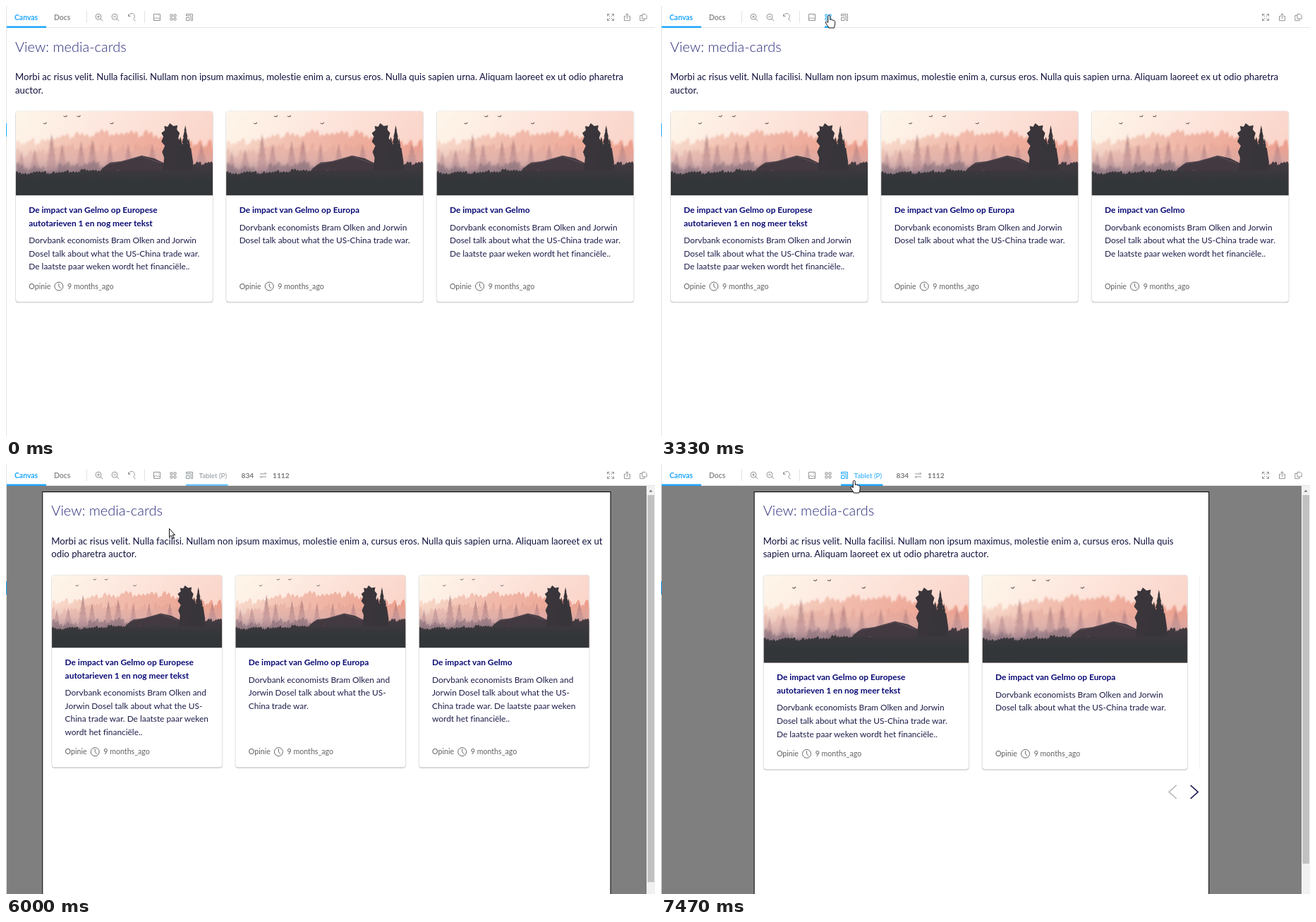
Write an HTML page that moves like this. It is 920 px wide and 609 px high and loops after 8000 ms.

```html
<!DOCTYPE html>
<html lang="nl">
<head>
<meta charset="utf-8">
<title>media-cards</title>
<style>
  html, body { margin: 0; width: 100%; height: 100%; overflow: hidden; background: #fff; }
  svg { display: block; }
  text { font-family: Lato, "Open Sans", sans-serif; font-variant-ligatures: none; white-space: pre; }
  .heading { font-size: 20px; font-weight: 300; fill: #2b2b7c; }
  .intro { font-size: 13.2px; fill: #12123f; }
  .title { font-size: 11.95px; font-weight: 700; fill: #0a0a75; }
  .copy { font-size: 11.9px; fill: #1d1d4b; }
  .meta { font-size: 10.65px; fill: #626262; }
  .tab { font-size: 10.4px; font-weight: 700; }
  .size { font-size: 10.2px; font-weight: 700; fill: #7b7b7b; }
  .label { font-size: 9.8px; fill: currentColor; }
  .item { font-size: 9.6px; fill: #444; }
  .icon { fill: none; stroke: currentColor; color: #949494; }
  .accent { fill: #1ea7fd; }
</style>
</head>
<body>
<svg id="stage" width="920" height="609" viewBox="0 0 920 609">
  <defs>
    <linearGradient id="sky" x2="1" y2=".35">
      <stop offset="0" stop-color="#fef6ea"/><stop offset=".5" stop-color="#fde5dc"/><stop offset="1" stop-color="#fad4c9"/>
    </linearGradient>
    <linearGradient id="far">
      <stop offset="0" stop-color="#f7d5c5"/><stop offset=".35" stop-color="#eeb3a2"/><stop offset="1" stop-color="#e98f7b"/>
    </linearGradient>
    <linearGradient id="mist" x2="0" y2="1">
      <stop offset="0" stop-color="#e8c4bd" stop-opacity="0"/><stop offset=".5" stop-color="#d3b0b2" stop-opacity=".7"/><stop offset="1" stop-color="#85768a"/>
    </linearGradient>
    <linearGradient id="hill" x2="0" y2="1">
      <stop offset="0" stop-color="#443b41"/><stop offset=".6" stop-color="#323639"/>
    </linearGradient>
    <clipPath id="rounded"><path d="M0 120V4Q0 0 4 0H276Q280 0 280 4V120Z"/></clipPath>
    <filter id="haze"><feGaussianBlur stdDeviation=".8"/></filter>
    <filter id="soft" x="-10%" y="-10%" width="120%" height="130%">
      <feDropShadow dx="0" dy="1" stdDeviation="1.6" flood-opacity=".22"/>
    </filter>
    <symbol id="photo" viewBox="0 0 280 119.5"></symbol>
  </defs>

  <rect width="920" height="609" fill="#fff"/>
  <g id="grid" stroke="#000">
    <path id="minor" stroke-opacity=".13"/>
    <path id="major" stroke-opacity=".38"/>
  </g>
  <g id="backdrop">
    <rect x="1" y="31" width="907" height="578" fill="#7f7f7f"/>
    <rect id="sheet" y="39.5" height="640" fill="#fff" stroke="#000"/>
  </g>
  <g id="page"></g>
  <g id="scrollbar">
    <rect x="908" y="31" width="12" height="578" fill="#f1f1f1"/>
    <path d="M911.5 39.5L914 36.5L916.5 39.5Z" fill="#777"/>
    <rect id="thumb" x="909.5" y="44" width="9.5" fill="#c1c1c1"/>
  </g>

  <rect width="920" height="30" fill="#fff"/>
  <path d="M0 30.5H920M.5 0V609M114.5 7V24M196.5 7V24" stroke="#e4e4e4"/>
  <rect class="accent" y="166" width="1" height="19"/>
  <rect class="accent" x="1" y="28.5" width="56" height="2.5"/>
  <text class="tab accent" x="12" y="19.5">Canvas</text>
  <text class="tab" x="68" y="19.5" fill="#8b8b8b">Docs</text>
  <g id="icons"></g>
  <rect id="gridLine" class="accent" x="232" y="28.5" width="10" height="2.5"/>
  <g id="viewport">
    <rect id="tabletLine" class="accent" x="255" y="28.5" width="59.5" height="2.5"/>
    <text id="tabletLabel" class="label" x="273.5" y="20">Tablet (P)</text>
    <text class="size" x="333.5" y="19.5">834</text>
    <path class="icon" d="M360 14H369L366.5 12M369 18H360L362.5 20"/>
    <text class="size" x="378" y="19.5">1112</text>
  </g>
  <g id="menu">
    <rect x="190.5" y="38.5" width="139" height="74.5" rx="4" fill="#fff" fill-opacity=".95" filter="url(#soft)"/>
    <text class="item" x="202" y="55">Small mobile</text>
    <text class="item" x="202" y="79.7">Large mobile</text>
    <text class="item" x="202" y="104.3">Tablet</text>
  </g>
  <g id="cursor" fill="#fff" stroke="#111" stroke-linejoin="round">
    <path id="hand" d="M-1.7 10V1.2C-1.7-.6 1.3-.6 1.3 1.2V6C2.5 5.2 3.8 5.6 4 6.6C5 6 6.3 6.4 6.4 7.5C7.6 7.2 8.2 8 8.2 9V12C8.2 14 7 15.5 6.8 17.5H-.8C-1 15.5-3.5 13.5-5 10.5C-5.8 8.8-4 7.8-3 9Z"/>
    <path id="arrow" d="M.5.5V12.5L3.2 10.2L5.2 14.5L7 13.7L5.1 9.5H8.5Z"/>
  </g>
</svg>

<script>
const $ = id => document.getElementById(id);
const clamp = v => Math.min(1, Math.max(0, v));
const show = (id, on) => $(id).style.display = on ? '' : 'none';
const LOOP = 8000, TICK = 200 / 3;

// Solves the CSS "ease" curve for progress p.
function ease(p) {
  let lo = 0, hi = 1;
  for (let i = 0; i < 24; i++) {
    const s = (lo + hi) / 2;
    if (.75 * s * (1 - s) + s ** 3 < p) lo = s; else hi = s;
  }
  return .3 * (1 - lo) ** 2 * lo + 3 * (1 - lo) * lo * lo + lo ** 3;
}
const ramp = (t, start, duration = 200) => ease(clamp((t - start) / duration));
const pulse = (t, on, off) => ramp(t, on) - ramp(t, off);

/* Grid overlay */
function gridPath(step) {
  let d = '';
  for (let v = step; v < 920; v += step) {
    const at = Math.floor(v + .01) + .5;
    d += `M${at} 31V609M1 ${at + 30}H920`;
  }
  return d;
}
$('minor').setAttribute('d', gridPath(15.42));
$('major').setAttribute('d', gridPath(77.1));

/* Landscape used on every card */
function conifer(x, top, base, width) {
  const left = [], right = [];
  for (let i = 1; i <= 7; i++) {
    const k = i / 7, y = top + (base - top) * k;
    right.push(`${x + width * k} ${y}`, `${x + width * k * .6} ${y - 1}`);
    left.unshift(`${x - width * k * .6} ${y - 1}`, `${x - width * k} ${y}`);
  }
  return `M${x} ${top}L${right.join('L')}L${left.join('L')}Z`;
}
function ridge(seed, step, spread, top) {
  let d = 'M0 120';
  const random = () => (seed = seed * 16807 % 2147483647) / 2147483647;
  for (let x = 0; x <= 280; x += step) {
    const y = top(x) + random() * spread;
    d += `L${x} ${y + spread * .4}L${x + step * .3} ${y + spread * .1}L${x + step * .5} ${y}L${x + step * .75} ${y + spread * .2}`;
  }
  return d + 'L281 120Z';
}
function landscape() {
  const path = (d, fill, more = '') => `<path d="${d}" fill="${fill}" ${more}/>`;
  const grove = [[8, 56, 8], [27, 54, 11], [51, 32, 11], [66, 46, 11], [93, 42, 11], [109, 40, 12],
    [134, 48, 10], [160, 46, 11], [194, 46, 12], [264, 46, 14]];
  const bird = ([x, y]) => `M${x - 3} ${y}L${x} ${y + 1}L${x + 2} ${y - 1}`;
  return `<g clip-path="url(#rounded)"><rect width="280" height="120" fill="url(#sky)"/><g filter="url(#haze)">`
    + path(ridge(11, 7, 11, x => 41 - 17 * Math.sin(x / 89)), 'url(#far)', 'opacity=".8"')
    + path(ridge(29, 6, 13, x => 52 - 9 * Math.sin(x / 89)), '#d9948a', 'opacity=".35"')
    + path(grove.map(([x, y, w]) => conifer(x, y, 92, w)).join(''), '#98666e', 'opacity=".5"')
    + `<rect y="48" width="280" height="44" fill="url(#mist)" opacity=".7"/>`
    + path(ridge(47, 6, 10, x => 72 + 4 * Math.sin(x / 20)), '#7d6874', 'opacity=".5"') + '</g>'
    + path(ridge(71, 4, 5, x => x < 100 ? 85 - x / 25 : 81 - (x - 100) / 16), 'url(#hill)')
    + path('M122 82L134 73L151 71L179 63L197 67L211 74L220 84H122Z', '#433a41')
    + path('M132 75L152 71L179 64L207 74', 'none', 'stroke="#6b5962" stroke-width=".7"')
    + path('M209 84L211 66L208 58L212 49L207 43L210 36L207 31L212 27L211 21L216 22L219 17L224 21L230 20L229 26L233 31L231 38L235 45L237 52H249L252 72V84Z', '#39353a')
    + path(conifer(241, 20, 80, 12) + conifer(234, 36, 84, 12) + conifer(246, 38, 80, 7), '#38353a')
    + path([[42, 17], [71, 7], [90, 7], [137, 17]].map(bird).join(''), 'none', 'stroke="#6b5a5a" stroke-width="1.1"')
    + '</g>';
}
$('photo').innerHTML = landscape();

/* Toolbar icons, drawn around their centres */
const lens = 'M3 -.8A4 4 0 1 1 -5 -.8A4 4 0 1 1 3 -.8M2 2L5.2 5.2';
const icons = [
  ['zoomIn', 132, lens + 'M-3 -.8H1M-1 -2.8V1.2'],
  ['zoomOut', 155, lens + 'M-3 -.8H1'],
  ['reset', 178.5, 'M-5 -4.5V-1.5H-2M-4.5 -1.5A4.2 4.2 0 1 1 2 2.2L5.2 5.2'],
  ['photoIcon', 214, 'M-4.5 -4.5H4.5V4.5H-4.5ZM-4.5 3L-1.5 0L.5 2L2 .5L4.5 3M1.5 -2.5H2.7'],
  ['gridIcon', 237, 'M-4 -4H-1V-1H-4ZM1 -4H4V-1H1ZM-4 1H-1V4H-4ZM1 1H4V4H1Z'],
  ['deviceIcon', 260, 'M-4.5 -2V-4.5H4.5V4.5H2.5M-4.5 -2.3H2.3V4.5M-4.5 .2H0V4.5H-4.5Z'],
  ['expand', 857, 'M-4.5 -1.5V-4.5H-1.5M1.5 -4.5H4.5V-1.5M4.5 1.5V4.5H1.5M-1.5 4.5H-4.5V1.5M-4.5 -4.5L-1 -1M4.5 -4.5L1 -1M4.5 4.5L1 1M-4.5 4.5L-1 1'],
  ['share', 880.5, 'M-2 -1.5H-4V4.7H4V-1.5H2M0 2V-5M-2.3 -2.8L0 -5L2.3 -2.8'],
  ['copy', 903.5, 'M-1.5 -4.5H2.5L4.7 -2.3V2H-1.5ZM-1.5 -2.5H-4.7V4.7H1.5V2']
];
$('icons').innerHTML = icons.map(([id, x, d]) =>
  `<path id="${id}" class="icon" d="${d}" transform="translate(${x} 16)"/>`).join('');

/* Page content */
const text = (cls, x, y, value) => `<text class="${cls}" x="${x}" y="${y}">${value}</text>`;
const LINE = 18.6, GAP = 18.5;
const intro = 'Morbi ac risus velit. Nulla facilisi. Nullam non ipsum maximus, molestie enim a, cursus eros. Nulla quis sapien urna. Aliquam laoreet ex ut odio pharetra auctor.';
const lead = 'Dorvbank economists Bram Olken and';
const cards = [
  { title: ['De impact van Gelmo op Europese', 'autotarieven 1 en nog meer tekst'] },
  { title: ['De impact van Gelmo op Europa'], brief: true },
  { title: ['De impact van Gelmo'] }
];

function introLines(width) {
  const [, last] = [[885, 'pharetra'], [800, 'ut'], [730, 'Aliquam'], [682, 'urna.'], [646.5, 'sapien'], [0, 'quis']]
    .find(([min]) => width >= min);
  const cut = intro.indexOf(` ${last} `) + last.length + 1;
  return [intro.slice(0, cut), intro.slice(cut + 1)];
}
function copyLines(width, brief) {
  let copy;
  if (width > 310) copy = `${lead} Jorwin Dosel|talk about what the US-China trade war. De laatste|paar weken wordt het financiële..`;
  else if (width > 292.3) copy = `${lead} Jorwin|Dosel talk about what the US-China trade war. De|laatste paar weken wordt het financiële..`;
  else if (width > 262) copy = `${lead} Jorwin|Dosel talk about what the US-China trade war.|De laatste paar weken wordt het financiële..`;
  else copy = `${lead}|Jorwin Dosel talk about what the US-|China trade war. De laatste paar weken|wordt het financiële..`;
  if (brief) copy = copy.split('war.')[0] + 'war.';
  return copy.split('|');
}

function pageMarkup(left, width, shift) {
  const columns = width > 766 ? 3 : 2;
  const w = (width - 43 - GAP * (columns - 1)) / columns;
  const top = 149 + shift, photoHeight = (w - .5) * .4268;
  const firstLine = top + photoHeight + 24.8;
  const metaLine = firstLine + LINE * copyLines(w).length + 24.6 + 27.3;
  const bottom = metaLine + 18.5;
  let out = text('heading', left + 12.5, 65 + shift, 'View: media-cards');
  introLines(width).forEach((line, i) => out += text('intro', left + 12.5, 105.3 + shift + i * LINE, line));

  cards.slice(0, columns).forEach((card, i) => {
    const x = left + 13 + i * (w + GAP), tx = x + 18.8;
    const box = `x="${x}" width="${w}" height="${bottom - top}" rx="4"`;
    out += `<rect ${box} y="${top + 1}" fill="#b4b4b4"/><rect ${box} y="${top}" fill="#fff" stroke="#dedede"/>`
      + `<use href="#photo" x="${x + .25}" y="${top}" width="${w - .5}" height="${photoHeight}"/>`;
    card.title.forEach((line, n) => out += text('title', tx, firstLine + n * LINE, line));
    const copyTop = firstLine + LINE * (card.title.length - 1) + 24.6;
    copyLines(w, card.brief).forEach((line, n) => out += text('copy', tx, copyTop + n * LINE, line));
    out += text('meta', tx, metaLine, 'Opinie') + text('meta', tx + 54.7, metaLine, '9 months_ago')
      + `<g transform="translate(${tx + 42.6} ${metaLine - 3.7})" fill="none" stroke="#666"><circle r="6"/><path d="M0 -4V0L2.5 3"/></g>`;
  });

  if (columns === 2) {
    const right = left + width, y = bottom + 32, edge = right - 13.3;
    out += `<path d="M${edge} ${top}V${bottom}" stroke="#f1f1f1"/><g fill="none" stroke-width="1.6">`
      + `<path d="M${right - 46} ${y - 9.5}l-10.5 9.5l10.5 9.5" stroke="#b4b4b4"/>`
      + `<path d="M${right - 26} ${y - 9.5}l10.5 9.5l-10.5 9.5" stroke="#0c0c4c"/></g>`;
  }
  return out;
}

/* Pointer route: time, x, y */
const route = [
  [933, 255, 1], [1000, 251, 5], [1067, 246, 8.5], [1133, 242, 11], [1267, 238.5, 13.5],
  [3600, 238.5, 13.5], [3800, 243, 14], [4067, 255, 15], [4200, 259, 14], [4867, 259, 14],
  [4933, 258.5, 18], [5000, 268, 30], [5067, 290, 46], [5133, 312, 60], [5200, 325, 72],
  [5267, 300, 84], [5333, 255, 91], [5400, 228, 92], [5800, 228, 92], [5867, 231, 91],
  [6867, 231, 91], [7000, 236, 80], [7200, 260, 40], [7267, 267, 29], [7467, 274, 23.5], [LOOP, 274, 23.5]
];
function pointer(t) {
  const i = Math.max(1, route.findIndex(([time]) => time >= t));
  const [t0, x0, y0] = route[i - 1], [t1, x1, y1] = route[i];
  const k = clamp((t - t0) / (t1 - t0));
  return [x0 + (x1 - x0) * k, y0 + (y1 - y0) * k];
}

const tint = amount => `rgb(${[[148, 30], [148, 167], [148, 253]].map(([a, b]) => Math.round(a + (b - a) * amount))})`;

let lastLayout = '';
function render(t) {
  const framed = t >= 5930;
  const p = ramp(t, 5922, 322);
  const width = framed ? 908.5 - 264 * p : 919.5;
  const left = framed ? 454.4 - width / 2 : .5;
  const layout = `${framed} ${width}`;
  if (layout !== lastLayout) {
    $('page').innerHTML = pageMarkup(left, width, framed ? 8.3 : 0);
    $('sheet').setAttribute('x', left);
    $('sheet').setAttribute('width', width);
    $('thumb').setAttribute('height', 565 - 43 * p);
    lastLayout = layout;
  }
  for (const id of ['backdrop', 'scrollbar', 'viewport']) show(id, framed);
  show('grid', t >= 1590 && t < 3330);

  const hover = pulse(t, 3930, 5860) + ramp(t, 7200);
  $('gridIcon').style.color = tint(pulse(t, 1050, 4330));
  $('deviceIcon').style.color = $('tabletLabel').style.color = tint(hover);
  $('gridLine').style.opacity = pulse(t, 1590, 3330);
  $('tabletLine').style.opacity = ramp(t, 5925);
  $('menu').style.opacity = t < 5860 ? clamp((t - 4290) / 150) : 0;

  const [x, y] = pointer(t), arrow = t >= 5860 && y > 31;
  show('cursor', t >= 930);
  show('hand', !arrow);
  show('arrow', arrow);
  $('cursor').setAttribute('transform', `translate(${x} ${y})`);
}

const start = performance.now();
function frame() {
  const t = (performance.now() - start) % LOOP;
  render(Math.floor((t + 4) / TICK) * TICK);
  requestAnimationFrame(frame);
}
frame();
</script>
</body>
</html>
```
